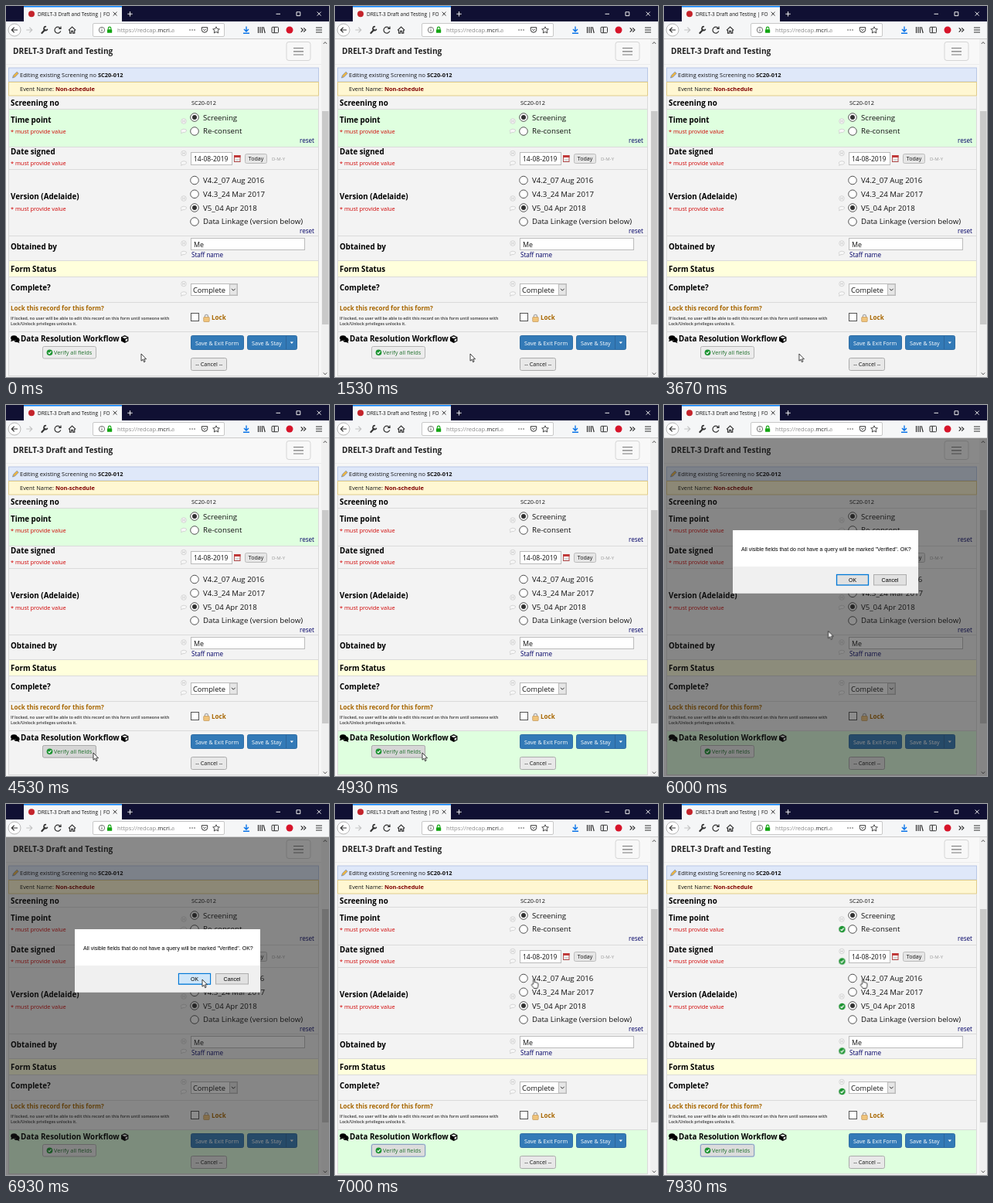
Recreate the animation shown at these times as an HTML page. Size 418 by 480 pixels, loop 8 s.

```html
<!DOCTYPE html>
<html lang="en">
<head>
<meta charset="utf-8">
<title>Form verification</title>
<style>
html, body { margin: 0; width: 100%; height: 100%; overflow: hidden; background: #f7f7f7; }
svg { display: block; width: 418px; height: 480px; }
text { font-family: "Open Sans", "Noto Sans", sans-serif; font-size: 7.45px; fill: #111; white-space: pre; }
.b { font-weight: 700; }
.title { font-size: 10.15px; font-weight: 700; fill: #222; }
.label { font-size: 9.8px; font-weight: 700; fill: #000; }
.option { font-size: 9.68px; }
.req { font-size: 7.4px; fill: #d00000; }
.link { font-size: 8.1px; fill: #000066; }
.brown { font-size: 8.05px; font-weight: 700; fill: #a86700; }
.tiny { font-size: 5.15px; font-weight: 700; fill: #555; }
.btn { font-size: 7.2px; }
.white { fill: #fff; }
.dlg text { font-family: "Liberation Sans", Arial, sans-serif; font-size: 7px; fill: #000; }
.mid { text-anchor: middle; }
.line { fill: none; stroke: #333; stroke-width: 1.2; }

.hl, .hover, .focus, .dlg, .ok, .hand, .tick { opacity: 0; }
.was, .hl, .hover, .focus, .dlg, .ok, .hand, .tick, .arrow { animation: 8s step-end infinite; }
.was { animation-name: was; }
.hl { animation-name: hl; }
.hover { animation-name: hover; }
.focus, .hand { animation-name: after; }
.dlg { animation-name: dlg; }
.ok { animation-name: ok; }
.arrow { animation-name: arrow; }
.t1 { animation-name: t1; }
.t2 { animation-name: t2; }
.t3 { animation-name: t3; }
.t4 { animation-name: t4; }
.t5 { animation-name: t5; }
.move { animation: move 8s cubic-bezier(.3, 0, .3, 1) infinite; }
@keyframes was { 60.9% { opacity: 0; } }
@keyframes hl { 60.9% { opacity: 1; } }
@keyframes hover { 52.5% { opacity: 1; } 70% { opacity: 0; } }
@keyframes dlg { 62.1% { opacity: 1; } 87.4% { opacity: 0; } }
@keyframes ok { 79% { opacity: 1; } }
@keyframes after { 87.4% { opacity: 1; } }
@keyframes arrow { 87.4% { opacity: 0; } }
@keyframes t1 { 89.8% { opacity: 1; } }
@keyframes t2 { 92% { opacity: 1; } }
@keyframes t3 { 94.3% { opacity: 1; } }
@keyframes t4 { 96.6% { opacity: 1; } }
@keyframes t5 { 98.7% { opacity: 1; } }
@keyframes move {
  0%, 45.6% { transform: translate(175px, 450px); }
  55%, 68.8% { transform: translate(113px, 450px); }
  82%, 100% { transform: translate(254px, 227px); }
}
</style>
</head>
<body>
<svg viewBox="0 0 418 480" xmlns="http://www.w3.org/2000/svg">
<defs>
  <g id="radio"><circle r="5.3" fill="#fff" stroke="#555"/></g>
  <g id="radio-on"><use href="#radio"/><circle r="3" fill="#333"/></g>
  <g id="notes" fill="#f8f8f8" stroke="#ccc" stroke-width=".8">
    <circle r="3.3"/>
    <path d="M-1.2-1.8v3.6M1.2-1.8v3.6M-1.2 0h2.4"/>
    <path d="M-2.8 11q3-1.6 6 0q1.4 2.2-1.5 3.4l-2.6.2l-2.6 1.2l.6-1.8q-2-1.4.1-3z"/>
  </g>
  <g id="tick">
    <circle r="4.2" fill="#1d9432"/>
    <path d="M-2 .1l1.5 1.6L2.2-1.5" fill="none" stroke="#fff" stroke-width="1.3"/>
  </g>
  <linearGradient id="fade">
    <stop offset="0" stop-color="#fff" stop-opacity="0"/>
    <stop offset="1" stop-color="#fff"/>
  </linearGradient>
</defs>

<!-- page -->
<rect width="418" height="480" fill="#f7f7f7"/>
<rect y="43" width="408" height="32" fill="#f8f8f8"/>
<path d="M0 75.5H408" stroke="#ececec"/>
<text class="title" x="9" y="61.5">DRELT-3 Draft and Testing</text>
<rect x="363" y="46.5" width="31" height="24" rx="3" fill="#f8f8f8" stroke="#d5d5d5"/>
<path d="M372 54.5h13M372 58.8h13M372 63h13" stroke="#777" stroke-width="1.2"/>

<rect x="3.5" y="80" width="401" height="18" fill="#dfe8f9" stroke="#b9c8e6"/>
<path d="M8.5 93l1-3.2l4.7-4.6l2 2l-4.7 4.8z" fill="#f2b63c" stroke="#6281b5" stroke-width=".7"/>
<text x="18" y="92.3">Editing existing Screening no <tspan class="b">SC20-012</tspan></text>
<rect x="3.5" y="98.5" width="401" height="17.5" fill="#fff7d2" stroke="#dfcb8a"/>
<text x="18" y="110.3">Event Name: <tspan class="b" fill="#800000">Non-schedule</tspan></text>

<rect x="3" y="117" width="401" height="363" fill="#f3f3f3"/>
<rect class="was" x="3" y="134" width="401" height="48" fill="#dfffdf"/>
<rect x="3" y="330" width="401" height="21" fill="#ffffdc"/>
<rect class="hl" x="3" y="422" width="401" height="56" fill="#dfffdf"/>
<path d="M3 133.5H404M3 182.5H404M3 211.5H404M3 297.5H404M3 329.5H404M3 350.5H404M3 383.5H404M3 421.5H404M3 478.5H404M3.5 117V479M404.5 117V479" stroke="#dadada"/>

<g>
  <text class="label" x="6" y="129">Screening no</text>
  <text class="label" x="6" y="151.3">Time point</text>
  <text class="label" x="6" y="192">Date signed</text>
  <text class="label" x="6" y="250.4">Version (Adelaide)</text>
  <text class="label" x="6" y="315">Obtained by</text>
  <text class="label" x="6" y="344.3">Form Status</text>
  <text class="label" x="6" y="367.8">Complete?</text>
  <text class="label" x="19" y="434.3">Data Resolution Workflow</text>
</g>
<text class="req" x="6" y="165.4">* must provide value</text>
<text class="req" x="6" y="206.2">* must provide value</text>
<text class="req" x="6" y="264.8">* must provide value</text>

<use href="#notes" x="230" y="149"/>
<use href="#notes" x="230" y="190.5"/>
<use href="#notes" x="230" y="249"/>
<use href="#notes" x="230" y="307"/>
<use href="#notes" x="230" y="359.5"/>
<use class="tick t1" href="#tick" x="230.5" y="162"/>
<use class="tick t2" href="#tick" x="230.5" y="203.5"/>
<use class="tick t3" href="#tick" x="230.5" y="262"/>
<use class="tick t4" href="#tick" x="230.5" y="319.5"/>
<use class="tick t5" href="#tick" x="230.5" y="372"/>

<text x="240" y="128.3" style="font-size:7.35px">SC20-012</text>
<use href="#radio-on" x="244" y="144"/>
<use href="#radio" x="244" y="162"/>
<use href="#radio" x="244" y="225.5"/>
<use href="#radio" x="244" y="243.3"/>
<use href="#radio-on" x="244" y="261"/>
<use href="#radio" x="244" y="279"/>
<text class="option" x="255" y="147.6">Screening</text>
<text class="option" x="255" y="165.4">Re-consent</text>
<text class="option" x="255" y="229">V4.2_07 Aug 2016</text>
<text class="option" x="255" y="246.8">V4.3_24 Mar 2017</text>
<text class="option" x="255" y="264.6">V5_04 Apr 2018</text>
<text class="option" x="255" y="282.4">Data Linkage (version below)</text>
<text class="link" x="380" y="177">reset</text>
<text class="link" x="380" y="294">reset</text>

<g fill="#fff" stroke="#bbb">
  <rect x="239.5" y="189.5" width="53" height="16"/>
  <rect x="239.5" y="300.5" width="147" height="15"/>
  <rect x="239.5" y="359.5" width="60" height="15"/>
  <rect x="289.5" y="360" width="9.5" height="14" fill="#e6e6e6"/>
  <rect x="309.5" y="191.5" width="28" height="12" rx="2" fill="#e6e6e6"/>
  <rect x="239.5" y="397.5" width="10" height="10" stroke="#555"/>
</g>
<text x="243" y="200.6" style="font-size:8.5px">14-08-2019</text>
<rect x="295.5" y="193.5" width="7.5" height="8" fill="#fff" stroke="#b04a4a"/>
<rect x="295" y="193" width="8.5" height="3" fill="#c03a3a"/>
<path d="M297 198.3h5M297 200h5" stroke="#999" stroke-width=".8" stroke-dasharray="1.2 .6"/>
<text class="mid" x="323.5" y="200.2" style="font-size:7.1px">Today</text>
<text x="344" y="199.5" style="font-size:6px;fill:#999">D-M-Y</text>
<text x="243" y="311.8" style="font-size:8.9px">Me</text>
<text class="link" x="240" y="325.3">Staff name</text>
<text x="242" y="370.5" style="font-size:9.3px">Complete</text>
<path class="line" d="M292 365.8l2.3 2.4l2.3-2.4" style="stroke-width:1"/>

<text class="brown" x="6" y="394">Lock this record for this form?</text>
<text class="tiny" x="6" y="406.2">If locked, no user will be able to edit this record on this form until someone with</text>
<text class="tiny" x="6" y="413.2">Lock/Unlock privileges unlocks it.</text>
<path d="M257.3 403v-1.5a2.1 2.1 0 0 1 4.2 0v1.5" fill="none" stroke="#aaa" stroke-width="1.2"/>
<rect x="255.7" y="402.5" width="7.5" height="6" rx=".7" fill="#f0c47c" stroke="#b98a48" stroke-width=".6"/>
<text class="brown" x="266" y="406.3">Lock</text>

<ellipse cx="10.3" cy="429.6" rx="4.2" ry="3.3"/>
<path d="M7.3 431l-1.2 3.2l4-1.4zM13.8 428.6q4 .9 3.8 3.8q-.2 1.4-1 1.9l1 2l-3-1.2q-3 .2-4.2-1.6q3.7-.8 3.4-4.9z"/>
<path d="M149 428.3l4.7-2.2l4.7 2.2v5.3l-4.7 2.3l-4.7-2.3z"/>
<path d="M150.3 428.8l3.4 1.4l3.4-1.4l-3.4-1.4zM154.6 434.1v-2.8l2.6-1.1v2.7z" fill="#f3f3f3"/>

<rect x="47.5" y="440.5" width="69" height="15.5" rx="2" fill="#ececec" stroke="#b5b5b5"/>
<rect class="hover" x="47.5" y="440.5" width="69" height="15.5" rx="2" fill="#d6d6d6" stroke="#aaa"/>
<g class="focus" fill="#dcdcdc">
  <rect x="46.5" y="439.5" width="71" height="17.5" rx="3" fill="#b5cbe6"/>
  <rect x="47.5" y="440.5" width="69" height="15.5" rx="2" stroke="#8aa0bd"/>
</g>
<use href="#tick" transform="translate(56.5 448.3) scale(.92)"/>
<text x="62" y="451" style="font-size:7.35px;fill:#1f702c">Verify all fields</text>

<g fill="#337ab7" stroke="#2e6da4">
  <rect x="239.5" y="426.5" width="68" height="18" rx="2"/>
  <rect x="312.5" y="426.5" width="64" height="18" rx="2"/>
</g>
<path d="M362.5 427v17" stroke="#2c669b"/>
<path d="M367.6 434.5h4.4l-2.2 2.6z" fill="#fff"/>
<text class="btn white" x="245" y="438.5">Save &amp; Exit Form</text>
<text class="btn white" x="318" y="438.5">Save &amp; Stay</text>
<rect x="239.5" y="455.5" width="46" height="16" rx="2" fill="#e8e8e8" stroke="#aaa"/>
<text class="btn mid" x="262.8" y="466.3">-- Cancel --</text>

<!-- scrollbar -->
<rect x="408" y="43" width="10" height="437" fill="#f0f0f0"/>
<rect x="409" y="136" width="8.5" height="276" fill="#c9c9c9"/>
<path d="M410.8 49l2.2-2.4l2.2 2.4M410.8 474.5l2.2 2.4l2.2-2.4" fill="none" stroke="#555"/>

<!-- dialog -->
<g class="dlg">
  <rect y="43" width="418" height="437" fill="#1a1a1a" fill-opacity=".5"/>
  <rect x="89" y="162" width="240" height="81.5" fill="#fff"/>
  <rect x="89" y="209" width="240" height="34.5" fill="#f0f0f0"/>
  <text x="100" y="189">All visible fields that do not have a query will be marked "Verified". OK?</text>
  <rect x="223.5" y="219.5" width="41" height="13.5" fill="#e1e1e1" stroke="#0078d7" stroke-width="1.3"/>
  <rect class="ok" x="223.5" y="219.5" width="41" height="13.5" fill="#cfe6f9" stroke="#0078d7"/>
  <rect x="271.5" y="219.5" width="42" height="13.5" fill="#e1e1e1" stroke="#adadad"/>
  <text class="mid" x="244" y="228.7">OK</text>
  <text class="mid" x="292.5" y="228.7">Cancel</text>
</g>

<!-- browser bar -->
<rect width="418" height="20" fill="#101033"/>
<rect x="23" width="127" height="20" fill="#f5f6f7"/>
<rect x="23" width="127" height="1.5" fill="#0a84ff"/>
<circle cx="33" cy="10.3" r="4" fill="#c4232b"/>
<text x="41" y="12.7" style="font-size:6.5px">DRELT-3 Draft and Testing | FO</text>
<path class="line" d="M138.7 7.8l4.8 4.8M143.5 7.8l-4.8 4.8" style="stroke-width:1"/>
<path d="M157.3 10.3h6.4M160.5 7.1v6.4M349.5 10.3h5.5M402.7 7.6l5 5M407.7 7.6l-5 5M376 7.8h4.8v4.8h-4.8z" fill="none" stroke="#eee"/>
<rect y="20" width="418" height="22.5" fill="#f5f6f7"/>
<path d="M0 42.5H418" stroke="#ccc"/>
<circle cx="11" cy="31" r="8" fill="#fff" stroke="#b8b8b8"/>
<path class="line" d="M15 31H7.5M10.7 27.6L7.3 31l3.4 3.4"/>
<path class="line" d="M26.3 31h7.2M30.4 27.6l3.4 3.4l-3.4 3.4" style="stroke:#c4c4c4"/>
<path d="M46.4 35l4-4.2" stroke="#333" stroke-width="2.2" stroke-linecap="round"/>
<path d="M52 26.8a2.4 2.4 0 1 0 1.7 3" fill="none" stroke="#333" stroke-width="1.6"/>
<path class="line" d="M70.4 29a4 4 0 1 0 .4 3.4M71 26.6v2.8h-2.9"/>
<path class="line" d="M81 31.4l4.6-4.3l4.6 4.3M82.5 31v4.2h2.1v-2.8h2v2.8h2.1V31"/>
<rect x="112.5" y="22.5" width="170" height="17" rx="1.5" fill="#fff" stroke="#c8c8c8"/>
<circle cx="124" cy="31" r="3.7" fill="none" stroke="#666" stroke-width=".9"/>
<path d="M124 30.5v2.6M124 28.6v1" stroke="#666"/>
<path d="M132.3 30.5v-1.6a1.8 1.8 0 0 1 3.6 0v1.6" fill="none" stroke="#12a512" stroke-width="1.1"/>
<rect x="131" y="30.3" width="6.2" height="4.5" rx=".6" fill="#12a512"/>
<text x="144" y="33.8" style="font-size:7.6px;fill:#888">https://redcap.<tspan fill="#222">mcri.a</tspan></text>
<rect x="210" y="25" width="12" height="12" fill="url(#fade)"/>
<path d="M238 31h.1M241 31h.1M244 31h.1" stroke="#555" stroke-width="1.6" stroke-linecap="round"/>
<path class="line" d="M253.3 27.7h7.4v2.8a3.7 3.7 0 0 1-7.4 0zM255.2 29.9l1.8 1.8l1.8-1.8" style="stroke-width:1"/>
<path class="line" d="M272 26.8l1.3 2.8l3 .3l-2.2 2.1l.6 3l-2.7-1.5l-2.7 1.5l.6-3l-2.2-2.1l3-.3z" style="stroke-width:.9"/>
<path d="M311 26.5v6.2M308 30l3 3l3-3M307 35.3h8" fill="none" stroke="#0a74e8" stroke-width="1.4"/>
<path class="line" d="M326.5 27v8M329 27v8M331.5 27v8M333.2 27.2l2 7.8"/>
<rect class="line" x="344" y="27.3" width="8.5" height="7.4" rx="1" style="stroke-width:1"/>
<path class="line" d="M347.3 27.5v7"/>
<circle cx="367" cy="31" r="4.5" fill="#d7142a"/>
<path class="line" d="M381.7 28.3l2.7 2.7l-2.7 2.7M385.2 28.3l2.7 2.7l-2.7 2.7"/>
<path class="line" d="M401 28h8M401 31h8M401 34h8"/>

<!-- pointer -->
<g class="move">
  <path class="arrow" d="M0 0v9.2l2.1-1.9l1.5 3.4l1.5-.7l-1.5-3.2h2.9z" fill="#fff" stroke="#111" stroke-width=".8"/>
  <path class="hand" transform="translate(3.5 0)" d="M-.9 6V.6q.9-1.2 1.8 0v3.2q1-.6 1.7.3q1-.5 1.6.5q1.2-.2 1.2 1v2.6q-.3 2-1.2 3.3h-4.3q-.9-1.8-2.8-3.8q-.5-1.5.6-1.6z" fill="#fff" stroke="#111" stroke-width=".8"/>
</g>
</svg>
</body>
</html>
```
